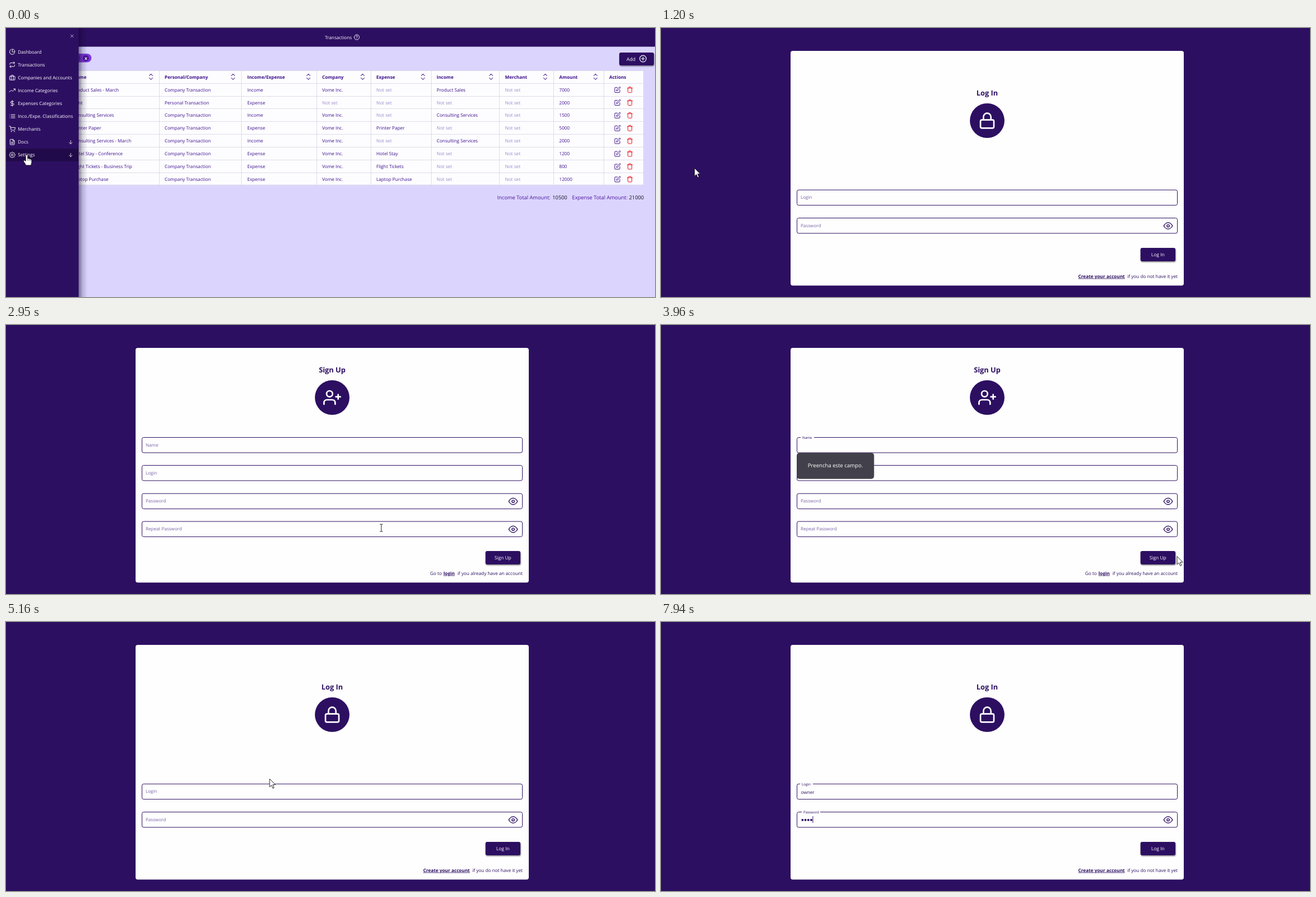
These frames come from a looping animation (1162x482 px, 8 s). An HTML page:

```html
<!DOCTYPE html>
<html lang="en">
<head>
<meta charset="utf-8">
<title>Transactions</title>
<style>
html, body { margin: 0; width: 100%; height: 100%; overflow: hidden; background: #2d0f62; }
svg { display: block; width: 1162px; height: 482px; }
text { font-family: "Open Sans", "Noto Sans", sans-serif; white-space: pre; text-rendering: geometricPrecision; }
</style>
</head>
<body>
<svg id="stage" viewBox="0 0 1162 482" xmlns="http://www.w3.org/2000/svg"></svg>
<script>
const DARK = '#2d0f62', INK = '#3d0f8c', MUTED = '#9c88c8', LOOP = 8000;
const stage = document.getElementById('stage');

const circle = (x, y, r) => `M${x - r} ${y}a${r} ${r} 0 1 0 ${2 * r} 0a${r} ${r} 0 1 0 ${-2 * r} 0z`;

function gear() {
  let d = '';
  for (let i = 0; i < 64; i++) {
    const a = i / 64 * Math.PI * 2, r = 9.6 + 1.3 * Math.tanh(3 * Math.cos(8 * a));
    d += `${i ? 'L' : 'M'}${(12 + r * Math.cos(a)).toFixed(2)} ${(12 + r * Math.sin(a)).toFixed(2)}`;
  }
  return d + 'z' + circle(12, 12, 3.4);
}

// Line icons on a 24 unit grid
const ICONS = {
  pie: 'M21.2 15.9A10 10 0 1 1 8 2.8M22 12A10 10 0 0 0 12 2v10z',
  repeat: 'M17 1l4 4-4 4M3 11V9a4 4 0 0 1 4-4h14M7 23l-4-4 4-4M21 13v2a4 4 0 0 1-4 4H3',
  briefcase: 'M4 7h16a2 2 0 0 1 2 2v10a2 2 0 0 1-2 2H4a2 2 0 0 1-2-2V9a2 2 0 0 1 2-2zM8 21V5a2 2 0 0 1 2-2h4a2 2 0 0 1 2 2v16',
  trend: 'M23 6l-9.5 9.5-5-5L1 18M17 6h6v6',
  dollar: 'M12 1v22M17 5H9.5a3.5 3.5 0 0 0 0 7h5a3.5 3.5 0 0 1 0 7H6',
  list: 'M8 6h14M8 12h14M8 18h14M3 6h.01M3 12h.01M3 18h.01',
  cart: 'M1 1h4l2.7 13.4a2 2 0 0 0 2 1.6h9.7a2 2 0 0 0 2-1.6L23 6H6' + circle(9, 21, 1) + circle(20, 21, 1),
  file: 'M14 2H6a2 2 0 0 0-2 2v16a2 2 0 0 0 2 2h12a2 2 0 0 0 2-2V8zM14 2v6h6M16 13H8M16 17H8',
  gear: gear(),
  logout: 'M9 21H5a2 2 0 0 1-2-2V5a2 2 0 0 1 2-2h4M16 17l5-5-5-5M21 12H9',
  down: 'M12 4v16M5 13l7 7 7-7',
  edit: 'M11 4H4a2 2 0 0 0-2 2v14a2 2 0 0 0 2 2h14a2 2 0 0 0 2-2v-7M18.5 2.5a2.1 2.1 0 0 1 3 3L12 15l-4 1 1-4z',
  trash: 'M3 6h18M19 6v14a2 2 0 0 1-2 2H7a2 2 0 0 1-2-2V6M8 6V4a2 2 0 0 1 2-2h4a2 2 0 0 1 2 2v2',
  plus: circle(12, 12, 10) + 'M12 7v10M7 12h10',
  help: circle(12, 12, 10) + 'M9 9a3 3 0 0 1 6 1c0 2-3 3-3 3M12 17h.01',
  lock: 'M5 11h14a2 2 0 0 1 2 2v7a2 2 0 0 1-2 2H5a2 2 0 0 1-2-2v-7a2 2 0 0 1 2-2zM7 11V7a5 5 0 0 1 10 0v4',
  user: 'M16 21v-2a4 4 0 0 0-4-4H5a4 4 0 0 0-4 4v2M20 8v6M23 11h-6' + circle(8.5, 7, 4),
  eye: 'M1 12s4-8 11-8 11 8 11 8-4 8-11 8-11-8-11-8z' + circle(12, 12, 3),
  sort: 'M6 8l6-6 6 6M6 16l6 6 6-6',
  menu: 'M3 5h18M3 12h18M3 19h18',
  close: 'M5 5l14 14M19 5L5 19'
};

const icon = (name, x, y, size, color = '#fff', width = 2) =>
  `<path d="${ICONS[name]}" transform="translate(${x - size / 2} ${y - size / 2}) scale(${size / 24})" fill="none" stroke="${color}" stroke-width="${width}" stroke-linecap="round" stroke-linejoin="round"/>`;
const text = (s, x, y, size, fill, extra = '') =>
  `<text x="${x}" y="${y}" font-size="${size}" fill="${fill}" ${extra}>${s}</text>`;
const rect = (x, y, w, h, fill, extra = '') =>
  `<rect x="${x}" y="${y}" width="${w}" height="${h}" fill="${fill}" ${extra}/>`;
const group = (id, body, extra = '') => `<g id="${id}" ${extra}>${body}</g>`;
const BOLD = 'font-weight="700"', MID = 'text-anchor="middle"';

function button(x, y, w, h) {
  return rect(x + .7, y + 1.4, w, h, '#000', 'rx="3" opacity=".5" filter="url(#soft)"') +
    rect(x, y, w, h, DARK, 'rx="3"');
}

function table() {
  const cols = [119.5, 284, 432, 566, 663, 771, 893.5, 990.5, 1080];
  const edges = [274.5, 421.5, 556.5, 653.5, 761.5, 883.5, 980.5, 1070.5, 1141.5];
  const heads = ['Name', 'Personal/Company', 'Income/Expense', 'Company', 'Expense', 'Income', 'Merchant', 'Amount', 'Actions'];
  const rows = [
    ['Product Sales - March', 'Income', 'Product Sales', 7000],
    ['Rent', 'Expense', '', 2000],
    ['Consulting Services', 'Income', 'Consulting Services', 1500],
    ['Printer Paper', 'Expense', 'Printer Paper', 5000],
    ['Consulting Services - March', 'Income', 'Consulting Services', 2000],
    ['Hotel Stay - Conference', 'Expense', 'Hotel Stay', 1200],
    ['Flight Tickets - Business Trip', 'Expense', 'Flight Tickets', 800],
    ['Laptop Purchase', 'Expense', 'Laptop Purchase', 12000]
  ];
  let out = rect(20, 76.5, 1121.5, 204.7, '#fdfdff', 'stroke="#d9d6e6"');
  heads.forEach((h, i) => {
    out += text(h, cols[i], 91.2, 8.2, INK, BOLD);
    if (i < 8) out += icon('sort', edges[i] - 15, 87.3, 12, '#5d3ba0', 2.2);
  });
  rows.forEach(([name, kind, item, amount], r) => {
    const y = 110.6 + r * 22.9, own = name === 'Rent', income = kind === 'Income';
    const cells = [name, own ? 'Personal Transaction' : 'Company Transaction', kind, own ? '' : 'Vome Inc.',
      income ? '' : item, income ? item : '', '', amount];
    out += rect(20, Math.round(y - 12) + .0, 1121.5, 1, '#dedbe9');
    cells.forEach((c, i) => out += text(c || 'Not set', cols[i], y + 3, 8.2, c ? INK : MUTED));
    out += icon('edit', 1095, y, 12, INK) + icon('trash', 1117, y, 12, '#e8141c');
  });
  edges.slice(0, 8).forEach(x => out += rect(x - .5, 77, 1, 204, '#dedbe9'));
  return out;
}

function ledger() {
  return rect(0, 0, 1162, 482, '#dbd5fe') + rect(0, 0, 1162, 33.5, DARK) + icon('menu', 16, 16, 14) +
    text('Transactions', 571, 19.8, 8.2, '#fff') + icon('help', 628, 16.5, 11) +
    rect(40, 46, 113, 15.5, '#7c38de', 'rx="7.7"') + text('01', 134, 57, 8.2, DARK, 'text-anchor="end"') +
    `<circle cx="143" cy="54" r="5.5" fill="#4c1597"/>` + text('x', 143, 56.6, 8, '#fff', MID + BOLD) +
    button(1098, 44, 62, 23) + text('Add', 1111, 58.8, 8.6, '#fff') + icon('plus', 1140.5, 55, 14) + table() +
    text('Income Total Amount:', 879.5, 306.8, 9.3, '#4c149b') + text('10500', 978.3, 306.8, 9.3, '#151020') +
    text('Expense Total Amount:', 1013.5, 306.8, 9.3, '#4c149b') + text('21000', 1115.5, 306.8, 9.3, '#151020');
}

function sidebar() {
  const items = [['pie', 'Dashboard'], ['repeat', 'Transactions'], ['briefcase', 'Companies and Accounts'],
    ['trend', 'Income Categories'], ['dollar', 'Expenses Categories'], ['list', 'Inco./Expe. Classifications'],
    ['cart', 'Merchants'], ['file', 'Docs'], ['gear', 'Settings']];
  let out = `<rect id="shade" y="0" width="16" height="482" fill="url(#fade)"/><rect id="panel" width="130" height="482" fill="${DARK}"/>` +
    `<rect id="hover" y="216" width="130" height="23" fill="#210a49"/>` +
    group('sub', rect(5, 235, 112, 23.5, '#190831', 'id="subHover" rx="2"') + icon('logout', 18, 246, 10.5) +
      text('Logout', 27.3, 249.3, 8.5, '#fff', 'id="logout"'));
  items.forEach(([name, label], i) => {
    const y = 42.6 + i * 23.1;
    out += icon(name, 11.2, y, 11.5) + text(label, 21.2, y + 3, 8.25, '#fff');
  });
  return out + group('edge', icon('close', 118.2, 14.3, 8) + icon('down', 115.8, 204.6, 9.5) +
    group('turn', icon('down', 115.8, 227.6, 9.5)));
}

// Form inputs with floating labels: [id, page, label, top, floated x, notch start, notch end]
const FIELDS = [
  ['name', 'signup', 'Name', 201.5, 253, 250, 274], ['mail', 'signup', 'Login', 251.5, 252, 249, 272],
  ['pass', 'signup', 'Password', 302, 255, 251, 285], ['again', 'signup', 'Repeat Password', 352, 253, 250, 300],
  ['user', 'login', 'Login', 290.2, 252, 249, 272], ['key', 'login', 'Password', 340.5, 255, 252, 285]
];

function form(page, title, glyph, circleY, buttonY, note) {
  let out = rect(0, 0, 1162, 482, DARK) + rect(232, 41, 704, 420.5, '#fefefe', 'rx="4"') +
    text(title, 584, circleY - 45, 12.8, DARK, MID + BOLD) +
    `<circle cx="584" cy="${circleY}" r="31" fill="${DARK}"/>` + icon(glyph, 584, circleY, 32);
  FIELDS.filter(f => f[1] === page).forEach(([id, , label, y, , a, b]) => {
    out += rect(243.5, y, 681, 27.4, 'none', `rx="3" stroke="${DARK}"`) +
      rect(a, y - 1, b - a, 2, '#fefefe', `id="${id}Gap"`) + text(label, 250, y + 16, 8.1, '#7a62a8', `id="${id}Label"`);
    if (/Password/.test(label)) out += icon('eye', 908, y + 14, 17, DARK, 2.1);
  });
  return out + button(858.5, buttonY, 62.5, 24) + text(title, 889.7, buttonY + 14.8, 8.4, '#fff', MID) + note;
}

const LINK = BOLD + ' text-decoration="underline"';
const note = (s, x, extra) => text(s, x, 447.7, 8.25, DARK, extra);

stage.innerHTML = `<defs>
  <filter id="soft" x="-20%" y="-30%" width="140%" height="170%"><feGaussianBlur stdDeviation="1"/></filter>
  <linearGradient id="fade"><stop stop-color="#0d0424" stop-opacity=".5"/><stop offset=".45" stop-color="#0d0424" stop-opacity=".17"/><stop offset="1" stop-color="#0d0424" stop-opacity="0"/></linearGradient></defs>` +
  group('ledger', ledger() + group('side', sidebar())) +
  group('login', form('login', 'Log In', 'lock', 166, 394,
    note('Create your account', 747, LINK) + note('if you do not have it yet', 925, 'text-anchor="end"')) +
    text('', 250.6, 307.6, 8.2, DARK, 'id="typed"') + group('dots', '')) +
  group('signup', form('signup', 'Sign Up', 'user', 130, 405,
    note('Go to', 759.3) + note('login', 783.3, LINK) + note('if you already have an account', 925, 'text-anchor="end"')) +
    group('tip', rect(243, 229, 138.5, 46.8, '#42414b', 'rx="5"') + text('Preencha este campo.', 262.8, 255.2, 9.6, '#fff'))) +
  `<rect id="caret" width="1" height="12" fill="${DARK}"/>` +
  group('arrow', '<path d="M0 0V14.6L3.4 11.5 5.7 17 8 16 5.7 10.6H10.3z" fill="#fff" stroke="#111" stroke-width=".9"/>') +
  group('hand', '<path d="M-1.8 1.5Q-1.8 0 0 0T1.8 1.5V7Q3.5 6 4.5 7.4 6.2 6.8 7 8.2 9 7.8 9 10V13.5Q9 16 7.5 19H-1.5Q-2.5 16-5 13 -6.3 11-5 10.2T-1.8 11.5z" fill="#fff" stroke="#111" stroke-width=".9"/><path d="M1.8 7v4M4.5 8v3M7 9v2.5" stroke="#111" stroke-width=".6"/>') +
  group('beam', '<path d="M-2.7-6.5H-.8L0-6 .8-6.5H2.7M0-6V6M-2.7 6.5H-.8L0 6 .8 6.5H2.7" fill="none" stroke="#222"/>');

// Step tables: [time, value...]; each holds until the next
const POINTER = [
  [0, 'hand', 37, 227], [300, 'hand', 37, 229], [420, 'hand', 35, 236], [540, 'hand', 34, 245], [660, 'hand', 36, 252],
  [780, 'hand', 38, 251], [930, 'hand', 39, 250], [1080, 'arrow', 41.5, 249], [1200, 'arrow', 60, 251],
  [1320, 'arrow', 78, 259], [1470, 'arrow', 330, 318], [1590, 'arrow', 620, 383], [1740, 'arrow', 700, 418],
  [1860, 'arrow', 728, 434], [2010, 'arrow', 744, 439], [2130, 'hand', 756, 443], [2250, 'hand', 763, 445],
  [2400, 'hand', 767, 440], [2550, 'arrow', 796, 449], [2700, 'arrow', 826, 440], [2830, 'arrow', 642, 386],
  [2950, 'beam', 672, 363.5], [3090, 'beam', 735, 372], [3210, 'arrow', 812, 390], [3330, 'hand', 884, 410],
  [3450, 'hand', 905, 415], [3840, 'hand', 912, 415], [3960, 'arrow', 924, 414.5], [4090, 'arrow', 880, 465],
  [4210, 'arrow', 806, 446], [4380, 'hand', 795, 443], [4500, 'hand', 792, 442], [4770, 'arrow', 738, 418],
  [4890, 'arrow', 600, 340], [5010, 'arrow', 491, 286], [5160, 'arrow', 472, 281], [5280, 'arrow', 470, 284],
  [5400, 'arrow', 470, 285], [5540, 'beam', 472, 292], [6180, 'none', 0, 0]
];
const PAGE = [[0, 'ledger'], [1200, 'login'], [2400, 'signup'], [4650, 'login']];
const FLOAT = {
  name: [[0, 0], [3450, .2], [3600, .8], [3720, 1], [4650, 0]],
  user: [[0, 0], [5540, .2], [5660, .75], [5790, 1]],
  key: [[0, 0], [6720, .25], [6840, .7], [6990, 1]]
};
const TYPED = [[0, 0], [6180, 1], [6300, 2], [6420, 4], [6570, 5]];
const DOTS = [[0, 0], [7550, 1], [7700, 2], [7820, 3], [7940, 4]];
const TURN = [[0, 0], [300, 90], [420, 180]];
const CARET = [[0, ''], [3450, 'name'], [3960, ''], [4500, 'name'], [4650, ''], [5540, 'user'], [6720, 'key'], [7240, ''], [7550, 'key']];

const $ = id => document.getElementById(id);
const at = (steps, t) => steps.findLast(s => s[0] <= t).slice(1);
const show = (id, on) => $(id).setAttribute('display', on ? 'inline' : 'none');
const set = (id, attrs) => { for (const k in attrs) $(id).setAttribute(k, attrs[k]); };

function draw(t) {
  const [page] = at(PAGE, t);
  ['ledger', 'login', 'signup'].forEach(p => show(p, p === page));

  const closing = t >= 1080, width = closing ? 125.5 : 130, open = t >= 150, over = t >= 540;
  set('panel', { width });
  set('shade', { x: width });
  set('side', { opacity: closing ? .97 : 1 });
  set('hover', { width, height: open ? 47 : 23, fill: over ? '#270c53' : '#210a49' });
  set('edge', { transform: `translate(${closing ? -4.2 : 0} 0)` });
  set('turn', { transform: `rotate(${at(TURN, t)[0]} 115.8 227.6)` });
  show('sub', open);
  show('subHover', over);
  set('logout', { 'text-decoration': over ? 'underline' : 'none' });

  for (const [id, , , y, x] of FIELDS) {
    const f = FLOAT[id] ? at(FLOAT[id], t)[0] : 0;
    set(id + 'Label', { x: 250 + (x - 250) * f, y: y + 16 - 13.3 * f, 'font-size': 8.1 - 1.9 * f, fill: f > .5 ? DARK : '#7a62a8' });
    show(id + 'Gap', f > .5);
  }
  show('tip', t >= 3720 && t < 4210);

  const typed = 'owner'.slice(0, at(TYPED, t)[0]), [dots] = at(DOTS, t), [focus] = at(CARET, t);
  $('typed').textContent = typed;
  $('dots').innerHTML = Array.from({ length: dots }, (_, i) =>
    `<circle cx="${253.4 + i * 5.2}" cy="354.7" r="1.95" fill="${DARK}"/>`).join('');
  show('caret', focus);
  if (focus) {
    const end = focus === 'user' && typed ? 251 + $('typed').getComputedTextLength() : 251 + (focus === 'key' ? dots * 5.1 : 0);
    set('caret', { x: end, y: { name: 209, user: 298, key: 348 }[focus] });
  }

  const [kind, x, y] = at(POINTER, t);
  ['arrow', 'hand', 'beam'].forEach(k => show(k, k === kind));
  if (kind !== 'none') set(kind, { transform: `translate(${x} ${y})` });
}

const start = performance.now();
function tick() {
  draw((performance.now() - start) % LOOP);
  requestAnimationFrame(tick);
}
tick();
</script>
</body>
</html>
```
